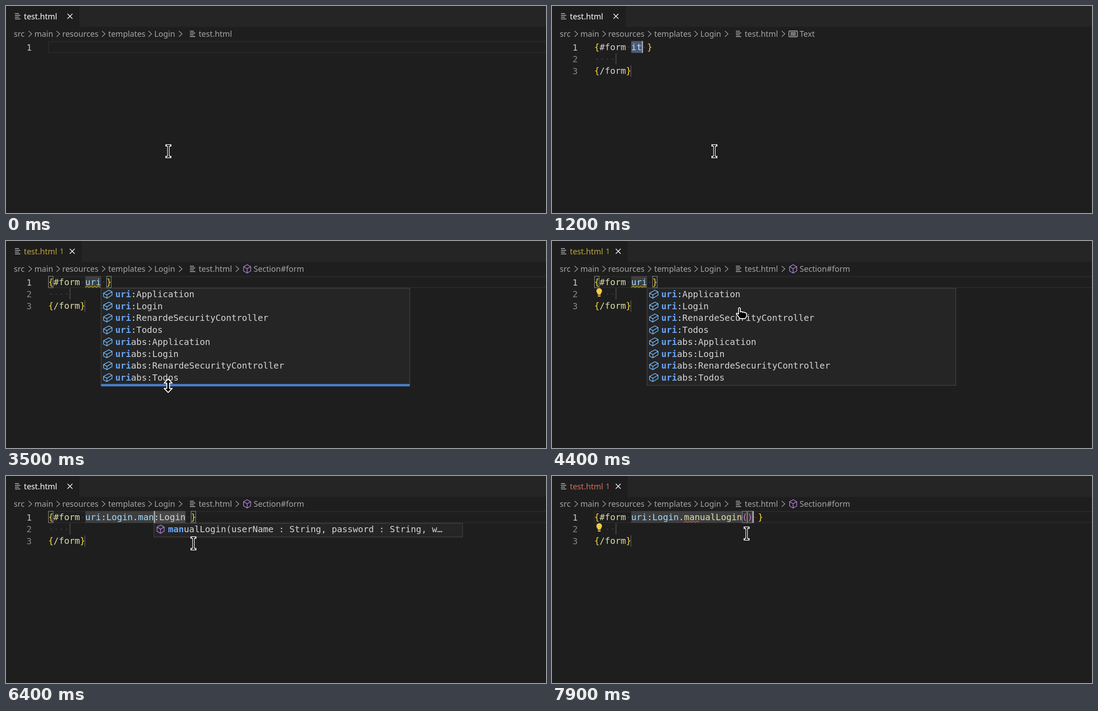
Recreate the animation shown at these times as an HTML page. Size 1207 by 464 pixels, loop 8 s.

```html
<!DOCTYPE html>
<html lang="en">
<head>
<meta charset="utf-8">
<title>Template editor</title>
<style>
html, body { margin: 0; width: 100%; height: 100%; overflow: hidden; background: #1e1e1e; }
svg { display: block; }
text { white-space: pre; }
.ui { font: 17.7px "Noto Sans", sans-serif; }
.code { font: 19.6px "DejaVu Sans Mono", monospace; }
</style>
</head>
<body>
<svg id="stage" width="1207" height="464" viewBox="0 0 1207 464"></svg>
<script>
const LOOP = 8000, X0 = 94.5, CW = 11.8, TOP = 78.5, LH = 26.7;
const WHITE = '#d4d4d4', BLUE = '#9cdcfe', CREAM = '#dcdcaa', GOLD = '#fbd838', PURPLE = '#da70d6';
const WARN = '#cca700', ERROR = '#f14c4c', MUTED = '#a5a5a5', METHOD = '#b180d7';
const colX = c => X0 + c * CW;
const baseline = line => 98.5 + line * LH;

const controllers = ['Application', 'Login', 'RenardeSecurityController', 'Todos'];
const uriRows = ['uri:', 'uriabs:'].flatMap(p => controllers.map(c => p + c));
const uriPopup = { col: 10, rows: uriRows, match: 3, icon: 'field' };
const formRows = ['form', 'for', 'fragment', 'fieldset', 'figure', 'footer', 'frameset'];
const loginRow = 'manualLogin(userName : String, password : String, w…';
const loginUri = [['uri', BLUE], [':', WHITE], ['Login', BLUE]];
const typed = name => [...loginUri, ['.', WHITE], [name, BLUE], [':Login', WHITE]];

// Each entry changes only the named parts of the state.
const steps = [
  [0, { raw: '', form: false, arg: [], col: 0, caret: false, ptr: ['beam', 363, 325.5], crumb: '', problem: '' }],
  [400, { raw: 'f', col: 1, caret: true }],
  [600, { raw: 'fo', col: 2, popup: { col: 2, rows: formRows, match: 1, icon: 'snippet', focus: true } }],
  [700, { raw: 'form', col: 4, popup: { col: 2, rows: ['form'], match: 4, icon: 'snippet', focus: true, docs: true } }],
  [1000, { crumb: 'Text' }],
  [1200, { form: true, arg: [['it', '#c8dcea']], selected: true, col: 9, popup: null }],
  [1300, { semantic: true, arg: [['it', BLUE]] }],
  [1600, { crumb: 'Section#form' }],
  [1700, { caret: false }],
  [1800, { problem: 'warn', wave: [7, 9, WARN] }],
  [2000, { bulb: true }],
  [2200, { caret: true }],
  [3000, { arg: [['u', BLUE]], selected: false, col: 8, match: 'outer', bulb: false, wave: [7, 8, WARN] }],
  [3100, { arg: [['u', BLUE], ['ri', WHITE]], col: 10, popup: uriPopup, ptr: ['resize', 362.5, 324.5] }],
  [3300, { arg: [['uri', BLUE]], wave: [7, 10, WARN], caret: false }],
  [3500, { sash: 1 }],
  [3600, { caret: true }],
  [3700, { bulb: true }],
  [4000, { sash: .5, ptr: ['hand', 418, 177] }],
  [4200, { sash: 0, ptr: ['hand', 425, 163] }],
  [4400, { caret: false, ptr: ['hand', 419, 151] }],
  [4700, { arg: [['uri', BLUE], [':Login', WHITE]], col: 16, caret: true, popup: null, ptr: ['beam', 419, 151] }],
  [5000, { bulb: false }],
  [5300, { arg: loginUri, problem: '', wave: null, caret: false }],
  [5700, { caret: true }],
  [6100, { arg: typed(''), col: 17, tail: 6 }],
  [6200, { arg: typed('m'), col: 18 }],
  [6400, { arg: typed('man'), col: 20, popup: { col: 20, rows: [loginRow], match: 3, icon: 'method' } }],
  [6900, { wave: [17, 20, ERROR], caret: false }],
  [7200, { problem: 'error', ptr: ['hand', 410, 139] }],
  [7400, { caret: true, ptr: ['hand', 435, 129] }],
  [7800, { arg: [...loginUri, ['.', WHITE], ['manualLogin', CREAM], ['()', PURPLE]], col: 30, tail: 0,
           match: 'call', popup: null, ptr: ['beam', 435, 129] }],
  [7900, { bulb: true }],
];
let state = {};
const states = steps.map(([at, change]) => [at, state = { ...state, ...change }]);

const text = (x, y, str, fill, cls = 'code', extra = '') =>
  `<text class="${cls}" x="${x}" y="${y}" fill="${fill}" ${extra}>${str}</text>`;
const rect = (x, y, w, h, fill, extra = '') =>
  `<rect x="${x}" y="${y}" width="${w}" height="${h}" fill="${fill}" ${extra}/>`;
const path = (d, stroke, width, x = 0, y = 0, fill = 'none', extra = '') =>
  `<path d="${d}" stroke="${stroke}" stroke-width="${width}" fill="${fill}" transform="translate(${x} ${y})" ${extra}/>`;
const cells = (from, to, fill, extra) => rect(colX(from), TOP, (to - from) * CW, LH, fill, extra);
const dot = (col, line) =>
  `<circle cx="${colX(col + .5)}" cy="${TOP + 14 + line * LH}" r="1.3" fill="#444"/>`;
const fileIcon = (x, y) => path('M0 1h9M0 5h12M0 9h9M0 13h12', '#c5c5c5', 1.5, x, y);

const icons = {
  method: (x, y) => path('M0-9.3L8-4.8V4.6L0 9.3L-8 4.6V-4.8ZM-8-4.8L0-.3L8-4.8M0-.3V9.3', METHOD, 1.5, x, y),
  field: (x, y) => path('M-9.5-2.5L2.5-9L9.5-5.5V2L-2 9L-9.5 5ZM-9.5-2.5L-2 1.5L9.5-5.5M-2 1.5V9', '#75beff', 1.5, x, y),
  snippet: (x, y) => path('M-8 8V-8H8V8M-8 8h3m3 0h4m3 0h3', '#c5c5c5', 1.5, x, y),
  text: (x, y) => path('M-8-6.5H8Q9.5-6.5 9.5-5V5Q9.5 6.5 8 6.5H-8Q-9.5 6.5-9.5 5V-5Q-9.5-6.5-8-6.5ZM-6-3H6M-6 0H6M-6 3H6',
    '#c5c5c5', 1.4, x, y),
};

const beamPath = 'M-4-13H4M0-13V13M-4 13H4';
const pointers = {
  beam: (x, y) => path(beamPath, '#fff', 5, x, y, 'none', 'stroke-linecap="square"') + path(beamPath, '#000', 2.2, x, y),
  resize: (x, y) => path('M0-15L9-6H3V6H9L0 15L-9 6H-3V-6H-9Z', '#fff', 2, x, y, '#000', 'stroke-linejoin="round"'),
  hand: (x, y) => path('M-2 0Q0-3 2 0V8Q5 6 7 9Q10 7 12 10Q15 9 16 12V17Q15 20 13 23H1Q-2 18-7 13Q-7 9-2 13Z',
    '#fff', 1.8, x, y, '#000', 'stroke-linejoin="round"'),
};

function header({ problem, crumb }) {
  const color = { warn: '#c0a23c', error: '#d0705f' }[problem] || '#fff';
  const width = problem ? 169 : 164;
  let out = rect(width, 0, 1207 - width, 47, '#252526') + fileIcon(20, 16) + text(40, 29.5, 'test.html', color, 'ui');
  if (problem) out += text(120, 29, 1, color, 'ui', 'style="font-size:16.5px"');
  out += path('M-5.5-5.5L5.5 5.5M5.5-5.5L-5.5 5.5', '#fff', 1.6, width - 21, 23);

  const names = [[17.5, 'src'], [63.5, 'main'], [125.7, 'resources'], [228.5, 'templates'], [331.5, 'Login'], [430.7, 'test.html']];
  out += names.map(([x, name]) => text(x, 69, name, MUTED, 'ui')).join('') + fileIcon(411, 55.5);
  out += [54, 116.5, 218, 322, 390, ...(crumb ? [517] : [])]
    .map(x => path('M-3.5-6.5L3.5 0L-3.5 6.5', MUTED, 1.4, x, 62.5)).join('');
  if (crumb) out += icons[crumb === 'Text' ? 'text' : 'method'](539, 62.5) + text(553.5, 69, crumb, MUTED, 'ui');
  return out;
}

function squiggle(from, to, color) {
  const end = colX(to);
  let d = `M${colX(from)} 104`;
  for (let x = colX(from) + 4.2, i = 0; x <= end + 1; x += 4.2, i++) d += `L${x} ${i % 2 ? 104 : 101}`;
  return path(d, color, 1.4);
}

function bulb() {
  return rect(X0, 106, 24, 22, '#1e1e1e') +
    path('M-3 6Q-3 4-5 1.5A6.3 6.3 0 1 1 5 1.5Q3 4 3 6ZM-3 7.5H3V10H-3Z', 'none', 0, 105.5, 114.5, '#f2cb45');
}

function editor(s) {
  const number = n => text(45.8, baseline(n - 1) + 1, n, n === 1 ? '#c6c6c6' : '#858585');
  let out = number(1);
  if (!s.selected) out += rect(X0 + .5, 79.7, 1130, 24.6, 'none', 'stroke="#282828" stroke-width="2.4"');
  if (!s.form) return out + text(X0, baseline(0), s.raw, WHITE);

  const end = 7 + s.arg.reduce((n, [str]) => n + str.length, 0);
  out += number(2) + number(3) + cells(7, end, s.selected ? '#4a5a78' : '#3e3e3f');
  if (s.tail) out += cells(end - s.tail, end, '#484848');
  const pair = { outer: [0, end + 1], call: [end - 2, end - 1] }[s.match] || [];
  out += pair.map(c => rect(colX(c) + .5, 79, CW - 1.5, 25.7, '#1f291f66', 'stroke="#888" stroke-width="1.2"')).join('');

  const name = s.semantic ? CREAM : WHITE;
  let col = 0;
  for (const [str, color] of [['{', GOLD], ['#form', name], [' ', name], ...s.arg, [' ', name], ['}', GOLD]]) {
    out += text(colX(col), baseline(0), str, color);
    col += str.length;
  }
  out += text(X0, baseline(2), '{', GOLD) + text(colX(1), baseline(2), '/form', name) + text(colX(6), baseline(2), '}', GOLD);
  out += dot(6, 0) + dot(end, 0) + [0, 1, 2, 3].map(c => dot(c, 1)).join('');
  out += rect(141.8, 106, 2.4, 25, '#404040') + rect(175.6, 133, 1.5, 26, '#5a5a5a');
  if (s.wave) out += squiggle(...s.wave);
  if (s.bulb) out += bulb();
  return out;
}

function popup({ col, rows, match, icon, focus, docs }, sash) {
  const x = colX(col), border = 'stroke="#454545" stroke-width="1.3"';
  let out = rect(x, 106, 690, rows.length * LH + 4, '#252526', border);
  if (focus) out += rect(x + 1, 107, 688, LH, '#04395e');
  rows.forEach((row, i) => {
    const y = 119.3 + i * LH;
    out += icons[icon](x + 15, y) +
      text(x + 31.7, y + 6.7, `<tspan fill="#69a6f8" font-weight="bold">${row.slice(0, match)}</tspan>${row.slice(match)}`, WHITE);
  });
  if (docs) {
    out += rect(x + 690, 106, 400, 92, '#252526', border);
    ['{#form uri}', '', '{/form}'].forEach((str, i) => out += text(x + 702, 127 + i * LH, str, WHITE));
  }
  if (sash) out += rect(x, 320.5, 690, 5.3, '#4a7ecb', `opacity="${sash}"`);
  return out;
}

function render(s) {
  const [kind, x, y] = s.ptr;
  return rect(0, 0, 1207, 464, '#1e1e1e') + header(s) + editor(s) +
    (s.caret ? rect(colX(s.col), TOP, 2.6, LH, '#b4b5b3') : '') +
    (s.popup ? popup(s.popup, s.sash) : '') + pointers[kind](x, y);
}

const stage = document.getElementById('stage');
let shown;
function tick() {
  const now = performance.now() % LOOP;
  const current = states.findLast(([at]) => at <= now)[1];
  if (current !== shown) stage.innerHTML = render(shown = current);
  requestAnimationFrame(tick);
}
tick();
</script>
</body>
</html>
```
